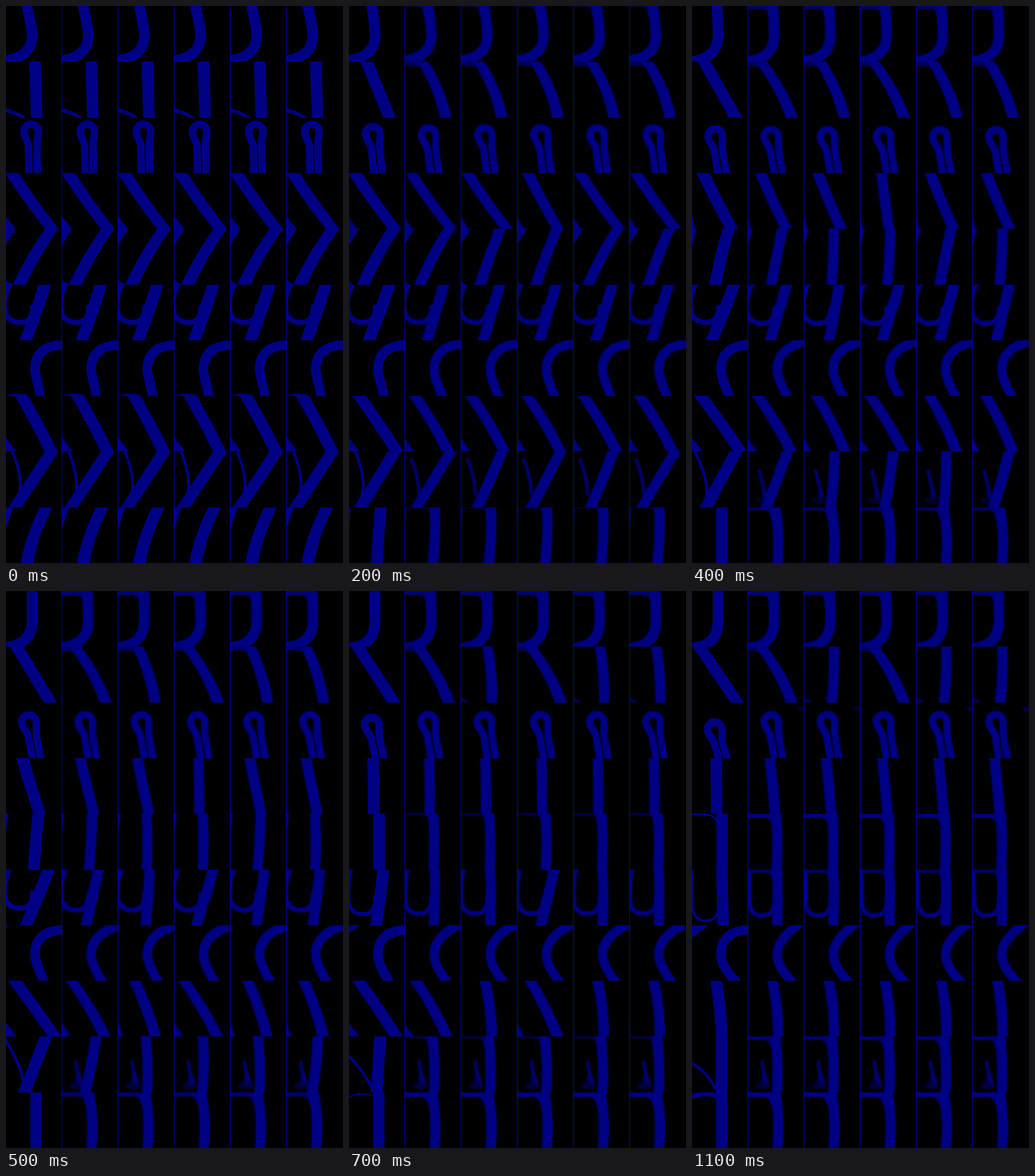
Recreate the animation shown at these times as an HTML page with a canvas. Size 582 px wide and 963 px high, loop 1200 ms.

```html
<!DOCTYPE html>
<html lang="en">
<head>
<meta charset="utf-8">
<title>Stroke grid</title>
<style>
html, body { margin: 0; width: 100%; height: 100%; overflow: hidden; background: #000; }
canvas { display: block; }
</style>
</head>
<body>
<canvas id="stage" width="582" height="963"></canvas>
<script>
const ctx = document.getElementById('stage').getContext('2d');
const INK = '#000084', EDGE = '#00009a', RULE = '#0000c8';
const STEPS = 12, STEP_MS = 100, COLS = 6, PITCH = 97, ROW = 96.3;
let soft = false;

// ---- motion helpers ----
const mix = (a, b, p) => a + (b - a) * p;
const ramp = (t, from, to) => Math.min(1, Math.max(0, (t - from) / (to - from)));
const smooth = (t, from, to) => {
  const p = ramp(t, from, to);
  return p * p * (3 - 2 * p);
};
const decay = (t, a, b, tau) => b + (a - b) * Math.exp(-t / tau);

// ---- drawing helpers, all in cell coordinates ----
function fill(build, alpha = 1) {
  ctx.beginPath();
  build();
  ctx.globalAlpha = alpha;
  ctx.fillStyle = INK;
  ctx.fill();
  if (!soft) {
    ctx.lineWidth = 1;
    ctx.strokeStyle = EDGE;
    ctx.stroke();
  }
  ctx.globalAlpha = 1;
}

function line(width, build, alpha = 1) {
  if (width < 0.3) return;
  ctx.beginPath();
  build();
  ctx.globalAlpha = alpha;
  ctx.strokeStyle = soft ? INK : EDGE;
  ctx.lineWidth = width;
  ctx.stroke();
  if (!soft && width > 3) {
    ctx.strokeStyle = INK;
    ctx.lineWidth = width - 2;
    ctx.stroke();
  }
  ctx.globalAlpha = 1;
}

function poly(points, alpha) {
  fill(() => {
    points.forEach(([x, y]) => ctx.lineTo(x, y));
    ctx.closePath();
  }, alpha);
}

// Band running from the top edge (a) to the bottom edge (b), bowed by bend.
function ribbon(a, b, bend = 0) {
  const half = (soft ? 8.8 : 9.2) + Math.abs(b - a) * 0.028;
  const mid = (a + b) / 2 + bend * 2;
  fill(() => {
    ctx.moveTo(a - half, -8);
    ctx.lineTo(a - half, 0);
    ctx.quadraticCurveTo(mid - half, ROW / 2, b - half, ROW);
    ctx.lineTo(b - half, 104);
    ctx.lineTo(b + half, 104);
    ctx.lineTo(b + half, ROW);
    ctx.quadraticCurveTo(mid + half, ROW / 2, a + half, 0);
    ctx.lineTo(a + half, -8);
    ctx.closePath();
  });
}

function wedgeTop(x, h) {
  if (x > 0.5) poly([[-4, -4], [x + 1, -4], [x, 0], [0, h], [-4, h + 4]]);
}

function wedgeBottom(x, h) {
  if (x > 0.5) poly([[-4, 100], [-4, ROW - h - 4], [0, ROW - h], [x, ROW], [x, 100]]);
}

// Bar along the top edge that rounds into the band at a.
function shoulder(a, h) {
  if (h < 0.5) return;
  const x = a - 8;
  fill(() => {
    ctx.moveTo(-8, -8);
    ctx.lineTo(a, -8);
    ctx.lineTo(a, h + 14);
    ctx.lineTo(x, h + 14);
    ctx.quadraticCurveTo(x, h, x - 13, h);
    ctx.lineTo(-8, h);
    ctx.closePath();
  }, Math.min(1, 0.4 + h * 0.08));
}

function blob(x, y, rx, ry, alpha) {
  fill(() => ctx.ellipse(x, y, rx, ry, 0, 0, Math.PI * 2), alpha);
}

// ---- rows: t is the row's own clock, s the step, c the column;
// lead is how many steps each soft column runs ahead ----
const hook = {
  draw(t) {
    const top = Math.min(35 + 2 * t, soft ? 44 : 45);
    const drop = 4 * ramp(t, 3, 6);
    line(18, () => {
      ctx.moveTo(top, -6);
      ctx.bezierCurveTo((top + 45) / 2, 20, 45, 36, 45, 52);
      ctx.bezierCurveTo(45, 72 + drop * 1.5, 32, 90 + drop * 1.7, -2, 95 + drop);
    });
    if (soft) shoulder(top, 7 * ramp(t, 1, 5));
  }
};

const leg = {
  lead: [0, 0, 1, 0, 1, 1],
  draw(t, s, c) {
    let a = decay(s, 50, 12, 2.8), b = decay(s, 53, 78, 1.8);
    if (soft) {
      const turn = this.lead[c] * ramp(s, 3, 8);
      a = mix(Math.max(a, 22), 51, turn);
      b = mix(Math.min(b, 75), 47, turn);
      if (turn < 0.5) line(10, () => {
        ctx.moveTo(-6, 2);
        ctx.lineTo(a, 4);
      }, 0.65);
      else poly([[-4, 86], [16, 97], [-4, 97]], 0.7);
      ribbon(a, b, mix(5, 2, turn));
      return;
    }
    ribbon(a, b);
    const y = 82 + 8 * s;
    fill(() => {
      ctx.moveTo(-3, y - 1);
      ctx.quadraticCurveTo(20, y + 4, 34, Math.max(97, y));
      ctx.lineTo(26, Math.max(97, y));
      ctx.quadraticCurveTo(15, y + 8, -3, y + 4);
    });
  }
};

const pin = {
  draw(t, s, c) {
    if (soft) t = Math.min(t * 1.5, 4.6);
    const x = decay(t, 43.5, 39, 2.8), top = 5.5 + 2 * t, foot = decay(t, 39.7, 46.5, 3);
    const y = top + 18.5, neck = top + 43;
    const left = mix(x - 5, foot, 0.35), right = left + 14.5;
    line(12.3, () => {
      ctx.moveTo(foot + 0.7, 102);
      ctx.lineTo(foot, ROW);
      ctx.lineTo(left, neck);
      ctx.bezierCurveTo(left - 2, neck - 9, x - 12.5, y + 9, x - 12.5, y);
      ctx.arc(x, y, 12.5, Math.PI, 0);
      ctx.bezierCurveTo(x + 12.5, y + 9, right - 1, neck - 9, right, neck);
      ctx.lineTo(foot + 14.7, ROW);
      ctx.lineTo(foot + 15.4, 102);
    });
    if (soft && c % 3) blob(95, 11, 10, 4, 0.6 * ramp(s, 8, 11));
  }
};

const upper = {
  lead: [0, 0.3, 0.5, 1.9, 0.5, 0.5],
  draw(t, s) {
    const p = smooth(t, 2.3, 7.2), tilt = soft ? 4 * ramp(s, 7, 11) : 0;
    ribbon(mix(10.5, 41.5, p) - tilt, mix(79, 42.5, p) + tilt, -2 + 2.5 * p);
    wedgeBottom(16 * (1 - ramp(s, 1, 5)), 20);
  }
};

const lower = {
  lead: [0, 0.2, 1.3, 1.2, 0.2, 1.2],
  draw(t, s) {
    const p = smooth(t, 1.2, 6.2), a = mix(79, soft ? 48.5 : 52, p);
    ribbon(a, mix(23, soft ? 49 : 52, p), mix(-3, soft ? 1.5 : 0, p));
    wedgeTop(16 * (1 - ramp(s, 2, 6)), 27);
    wedgeBottom(10 * (1 - ramp(s, 1, 3)), 6);
    if (soft) shoulder(a, 7 * ramp(s, 5, 10));
    else line(2.5 * ramp(s, 8, 11), () => {
      ctx.moveTo(-3, 1);
      ctx.lineTo(20, 1);
      ctx.quadraticCurveTo(42, 1, 47, 22);
    });
  }
};

const cup = {
  lead: [0, 1, 2.3, -1.2, 1.6, 1.8],
  draw(t, s) {
    const p = smooth(t, 4.6, 8.6), q = smooth(s, 4, 10);
    const a = soft ? mix(67, 50, p) : mix(67 + 1.4 * Math.min(t, 5), 51.5, p);
    const b = soft ? mix(38, 50, p) : mix(34, 54, p);
    const y = mix(65, soft ? 79 : 88, soft ? smooth(s, 2.5, 9) : q);
    const side = mix(-3, soft ? 2 : 1, q);
    line(mix(8.5, soft ? 7.5 : 4, q), () => {
      ctx.moveTo(mix(8, 1, q), -4);
      ctx.quadraticCurveTo(side, 15, side, y - 30);
      ctx.bezierCurveTo(side, y - 8, 9, y, 24, y);
      ctx.bezierCurveTo(39, y, 46, y - 8, 46, y - 30);
    });
    ribbon(a, b, soft ? p : 1 - p);
    if (soft) shoulder(a, 5 * ramp(s, 7, 11));
  }
};

const crook = {
  draw(t) {
    const k = soft ? ramp(t, 0, 11) : 0;
    const b = Math.min(75, 59 + 16 * ramp(t, 1, 11) + (soft ? 3 : 0));
    line(16, () => {
      ctx.moveTo(100 - 8 * k, 8 - 14 * k);
      ctx.bezierCurveTo(66 + 4 * k, 8 + 2 * k, 50, 24 + 6 * k, 50, 50);
      ctx.bezierCurveTo(50, 62, 57, 78, b, ROW);
      ctx.lineTo(b + 2, 102);
    });
    if (soft) return;
    const x = 28 * ramp(t, 4, 9);
    wedgeTop(x, x * 0.75);
    if (t < 2) blob(20, 97, 18, 4 - 3 * t, 1);
  }
};

const slope = {
  lead: [0, 0, 3.6, 0.7, 3.8, 3.8],
  draw(t, s) {
    const p = smooth(t, 6.2, 11.4);
    const a = soft ? 17 : decay(s, 27, 15, 1.3), b = soft ? 74 : decay(s, 78, 84, 1.3);
    ribbon(mix(a, 42.5, p), mix(b, 51.5, p), soft ? 2.5 : 1);
    wedgeBottom((soft ? 15 : 18) * (1 - p), 23);
  }
};

const twig = {
  lead: [0, 1, 2.7, 2.2, 2.9, 1.5],
  draw(t, s) {
    const p = smooth(t, 3, 8), a = mix(79, soft ? 47 : 51, p);
    if (soft) {
      const q = ramp(s, 2, 5);
      line(6, () => {
        ctx.moveTo(mix(10, 24, q), mix(12, 42, q));
        ctx.quadraticCurveTo(mix(24, 25, q), mix(45, 62, q), mix(24, 34, q), mix(76, 82, q));
      }, 0.8);
      blob(27, 73, 5, 10, 0.6 * q);
      blob(26, 85, 13, 6, 0.45 * q);
    } else {
      const q = smooth(s, 3, 7.5);
      line(4.5, () => {
        ctx.moveTo(mix(11, -2, ramp(s, 3, 5)), 46 * smooth(s, 4.2, 8.6));
        ctx.quadraticCurveTo(mix(31, 24, q), mix(50, 58, q), mix(22, 44, q), mix(78, 96, q));
      });
    }
    ribbon(a, mix(decay(s, 16, 22, 1.5), soft ? 50 : 51, p), soft ? 2 * p : 0);
    if (soft) shoulder(a, 6 * ramp(s, 5, 9));
  }
};

const stem = {
  draw(t) {
    const p = ramp(t, 0, 2.5), a = mix(69, soft ? 46.5 : 51.5, p);
    ribbon(a, mix(36, soft ? 50.5 : 51.5, p), mix(-4, soft ? 3.5 : 0, p));
    wedgeTop(11 * (1 - p), 33);
    if (soft) shoulder(a, 8 * ramp(t, 1, 6));
    else line(8 * ramp(t, 5.5, 11), () => {
      ctx.moveTo(-3, 9);
      ctx.quadraticCurveTo(24, -4, 48, 9);
    });
  }
};

const rows = [hook, leg, pin, upper, lower, cup, crook, slope, twig, stem];

function paint(step) {
  ctx.fillStyle = '#000';
  ctx.fillRect(0, 0, 582, 963);
  rows.forEach((row, r) => {
    const y = Math.round(r * ROW), next = Math.round((r + 1) * ROW);
    for (let c = 0; c < COLS; c++) {
      soft = c > 0 && step > 1;
      ctx.save();
      ctx.beginPath();
      ctx.rect(c * PITCH, y, PITCH, next - y);
      ctx.clip();
      ctx.translate(c * PITCH, y);
      if (soft) ctx.filter = `blur(${step > 2 ? 1.3 : 0.9}px)`;
      row.draw(step + (soft && row.lead ? row.lead[c] : 0), step, c);
      ctx.restore();
    }
  });
  ctx.fillStyle = RULE;
  for (let c = 1; c < COLS; c++) ctx.fillRect(c * PITCH - 1, 0, 1, 963);
}

let shown = -1;
function tick() {
  const step = Math.floor(performance.now() / STEP_MS) % STEPS;
  if (step !== shown) paint(shown = step);
  requestAnimationFrame(tick);
}
tick();
</script>
</body>
</html>
```
